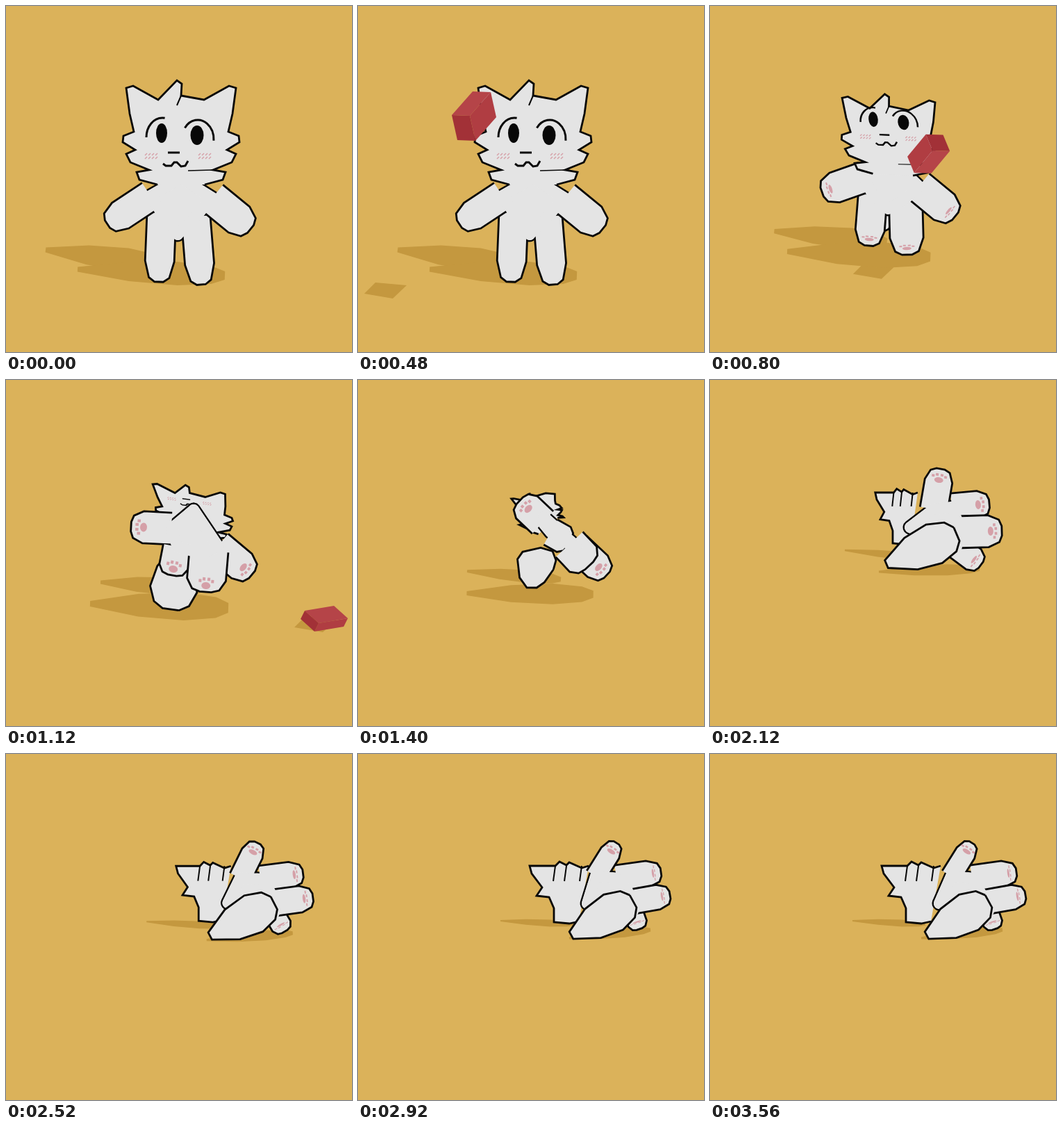
These frames come from a looping animation (498x498 px, 3.6 s). An HTML page with a canvas:

```html
<!DOCTYPE html>
<html>
<head>
<meta charset="utf-8">
<style>
html, body { margin: 0; height: 100%; overflow: hidden; background: #dbb25a; }
canvas { display: block; }
</style>
</head>
<body>
<canvas id="stage" width="498" height="498"></canvas>
<script>
const ctx = document.getElementById('stage').getContext('2d');
const INK = '#080808', FUR = '#e4e4e4', PINK = '#d5a0a8', SHADE = '#c4983f';
const LOOP = 3600, HIT = 540, LAND = 1120;

const mix = (a, b, u) => a + (b - a) * u;
const blend = (a, b, u) => Array.isArray(a) ? a.map((v, i) => blend(v, b[i], u)) : mix(a, b, u);
const parse = text => text.split(' ').map(p => p.split(',').map(Number));
const mirror = pts => pts.map(([x, y]) => [x, -y]).reverse();

// Half profiles: position along the axis, half width.
const limbHalf = parse('0,1 .7,1 .94,.7 1,.3');
const spindleHalf = parse('0,.35 .09,.75 .32,1 .65,.82 1,.2');
const LIMB = [...limbHalf, ...mirror(limbHalf)];
const SPINDLE = [...spindleHalf, ...mirror(spindleHalf), spindleHalf[0]];

// The facing head is symmetric apart from its tuft.
const cheek = parse('-34,72 -60,65 -64,54 -46,51 -73,40 -79,28 -66,22 -84,11 -83,2 -68,-4 -74,-30 -79,-67 -69,-70 -33,-50');
const FACING = [...cheek, ...parse('-6,-78 1,-73 0,-56'), ...cheek.map(([x, y]) => [-x, y]).reverse()];
const LYING = parse('-14,80 -28,83 -50,81 -50,61 -57,45 -75,43 -67,31 -82,11 -85,0 -48,0 -42,-6 -32,-1 -28,-5 -10,3 0,0');

// Limbs: base x, y, tip x, y, half width, paw pad length. Head: affine matrix.
const standing = {
  order: 'tail body legL legR armL armR fill head', shape: FACING, tilt: 0,
  head: [1, 0, 0, 1, 252, 185], chest: [252, 248], belly: [247, 329],
  armL: [208, 273, 146, 314, 22, 0], armR: [297, 276, 352, 321, 24, 0],
  legL: [224, 298, 220, 397, 21, 0], legR: [273, 303, 281, 401, 21, 0],
  tail: [240, 320, 250, 270, 15],
  shadows: [[230, 372, 57, 351, 17], [315, 388, 103, 379, 17]]
};
const airborne = {
  order: 'head tail body armL armR legL legR fill', shape: FACING, tilt: 1,
  head: [.66, .09, .1, .49, 270, 190], chest: [270, 187], belly: [268, 246],
  armL: [238, 214, 180, 211, 23, 1], armR: [305, 239, 354, 280, 23, .8],
  legL: [247, 240, 239, 281, 21, -1], legR: [292, 246, 287, 305, 28, -1],
  tail: [237, 330, 250, 240, 34],
  shadows: [[285, 300, 136, 291, 13], [320, 328, 121, 322, 20]]
};
const landing = {
  order: 'head body armR legL legR armL fill tail', shape: LYING, tilt: 3,
  head: [.55, 0, 0, .72, 273, 164], chest: [264, 208], belly: [324, 207],
  armL: [298, 195, 293, 131, 21, .8], armR: [325, 240, 363, 281, 19, .8],
  legL: [312, 195, 362, 171, 20, 1], legR: [318, 226, 385, 224, 25, 1],
  tail: [318, 227, 214, 267, 30],
  shadows: [[300, 272, 181, 257, 5], [360, 286, 197, 290, 9]]
};
const sliding = {
  ...landing,
  head: [.72, 0, 0, .9, 299, 162], chest: [288, 212], belly: [355, 200],
  armL: [322, 186, 332, 128, 20, .8], armR: [355, 240, 390, 266, 18, .4],
  legL: [348, 183, 402, 178, 20, .8], legR: [355, 219, 420, 217, 23, .8],
  tail: [355, 222, 254, 265, 30],
  shadows: [[330, 258, 194, 245, 6], [388, 272, 243, 276, 8]]
};
const resting = {
  ...landing,
  head: [1, 0, 0, 1, 332, 161], chest: [330, 215], belly: [388, 197],
  armL: [342, 176, 372, 128, 15, .6], armR: [396, 226, 405, 252, 14, .2],
  legL: [372, 179, 436, 170, 19, .3], legR: [392, 213, 449, 203, 18, .3],
  tail: [396, 212, 307, 261, 29],
  shadows: [[310, 245, 205, 240, 5], [421, 253, 304, 265, 7]]
};
// The body slides on a little while the head stays.
const settled = { ...resting };
for (const part of ['armL', 'armR', 'legL', 'legR', 'tail'])
  settled[part] = resting[part].map((v, i) => i === 0 || i === 2 ? v + 5 : v);

const linear = u => u, easeOut = u => 1 - (1 - u) ** 2;
const keys = [
  [0, standing, linear], [HIT, standing, linear], [LAND, airborne, linear], [1720, landing, linear],
  [2120, sliding, easeOut], [2920, resting, easeOut], [3560, settled, linear], [LOOP, settled, linear]
];

function draw(pts, fill, stroke, width = 2.8) {
  ctx.beginPath();
  pts.forEach(p => ctx.lineTo(...p));
  if (fill) { ctx.fillStyle = fill; ctx.fill(); }
  if (stroke) { ctx.strokeStyle = stroke; ctx.lineWidth = width; ctx.stroke(); }
}

// Stretches a profile from base to tip; foreshortened parts keep some length.
function along(profile, [x0, y0, x1, y1, w], minLength = 0) {
  const len = Math.hypot(x1 - x0, y1 - y0), dx = (x1 - x0) / len, dy = (y1 - y0) / len;
  const reach = Math.max(len, minLength);
  return profile.map(([s, k]) => [x0 + dx * s * reach - dy * k * w, y0 + dy * s * reach + dx * k * w]);
}

function drawPad([x0, y0, x1, y1, , size]) {
  if (Math.abs(size) < 0.1) return;
  ctx.save();
  ctx.translate(x1, y1);
  ctx.rotate(Math.atan2(y1 - y0, x1 - x0));
  ctx.translate(-9 - 9 * Math.max(size, 0), 0);
  ctx.scale(size, 1);
  ctx.fillStyle = PINK;
  ctx.beginPath();
  ctx.ellipse(0, 0, 5, 6.5, 0, 0, 7);
  ctx.fill();
  for (const y of [-9, -3.5, 3.5, 9]) ctx.fillRect(9 - Math.abs(y) / 2, y - 2, 4.5, 4);
  ctx.restore();
}

function drawLimb(limb) {
  draw(along(LIMB, limb, 1.5 * limb[4]), FUR, INK);
  drawPad(limb);
}

function drawBody(pose, outlined) {
  const bases = ['chest', 'armL', 'legL', 'belly', 'legR', 'armR', 'chest'].map(name => pose[name].slice(0, 2));
  ctx.lineJoin = ctx.lineCap = 'round';
  if (outlined) draw(bases, INK, INK, 21);
  draw(bases, FUR, FUR, 16);
  ctx.lineJoin = 'miter';
  ctx.lineCap = 'butt';
}

function ellipse(x, y, rx, ry, from = 0, to = 2) {
  ctx.beginPath();
  ctx.ellipse(x, y, rx, ry, 0, from * Math.PI, to * Math.PI);
}

const mouth = parse('-26,42 -22,45 -14,45 -10,40 -6,40 0,46 6,45 10,38');

// The face slides up the head as it tilts back.
function drawFace(matrix, tilt) {
  ctx.save();
  ctx.transform(...matrix);
  if (tilt < 0.5) {
    draw([[0, -56], [-6, -42]], null, INK, 2);
    draw([[10, 52], [45, 51]], null, INK, 1.5);
  }
  ctx.translate(0, -62 * tilt);
  ctx.lineWidth = 3;
  if (tilt < 0.5) for (const [x, y, rx, from, to] of [[-28, -2, 8, 1, 1.55], [23, 1, 9.5, 1.2, 2.02]]) {
    ellipse(x, y, rx, 14);
    ctx.fillStyle = INK;
    ctx.fill();
    ellipse(x + 1, y + 6, 23, 28, from, to);
    ctx.strokeStyle = INK;
    ctx.stroke();
  }
  draw([[-19, 26], [-2, 26]], null, INK, 3);
  draw(mouth, null, INK, 3);
  for (const x of [-44, 33])
    for (let i = 0; i < 8; i++) {
      const px = x - 8 + i % 4 * 5, py = 28 + (i >> 2) * 5;
      draw([[px, py + 2], [px + 3, py - 1]], null, PINK, 1.5);
    }
  ctx.restore();
}

const place = (pts, [a, b, c, d, e, f]) => pts.map(([x, y]) => [a * x + c * y + e, b * x + d * y + f]);

function drawHead(from, to, u, pose) {
  const [a, b] = [from, to].map(p => place(p.shape, p.head));
  const n = Math.max(a.length, b.length);
  const pick = (pts, i) => pts[Math.floor(i * pts.length / n)];
  draw(Array.from({ length: n }, (_, i) => blend(pick(a, i), pick(b, i), u)), FUR, INK);
  if (pose.tilt < 1.5) drawFace(pose.head, pose.tilt);
  if (pose.tilt > 2.5) for (const x of [-48, -32, -10]) draw(place([[x, 0], [x - 3, 22]], pose.head), null, INK, 2);
}

function drawCat(t) {
  const i = keys.findIndex((k, j) => t < keys[j + 1][0]);
  const [start, from, ease] = keys[i], [end, to] = keys[i + 1];
  const u = ease((t - start) / (end - start)), pose = {};
  for (const part in from)
    if (part !== 'order' && part !== 'shape') pose[part] = blend(from[part], to[part], u);
  for (const shadow of pose.shadows) draw(along(SPINDLE, shadow), SHADE);
  for (const part of (u < 0.5 ? from : to).order.split(' ')) {
    if (part === 'head') drawHead(from, to, u, pose);
    else if (part === 'body') drawBody(pose, true);
    else if (part === 'fill') drawBody(pose, false);
    else if (part === 'tail') draw(along(SPINDLE, pose.tail), FUR, INK);
    else drawLimb(pose[part]);
  }
}

// A brick is its near corner and the three edges leaving it.
const thrownEdges = parse('-26,-1 30,-34 8,36'), landedEdges = parse('-20,-18 42,-7 -6,12');
const faceColors = ['#b54448', '#b03d42', '#a23137'];

function drawBrick(t) {
  const flight = Math.min(t, HIT) - 480;
  const u = Math.max(0, Math.min(1, (t - HIT) / (LAND - HIT)));
  const slide = Math.max(0, t - LAND) * 0.45;
  const x = mix(161 + 0.9 * flight, 450, u) + slide, y = mix(158 + 0.24 * flight, 350, u * u);
  const sx = mix(40 + 0.45 * flight, 446, u) + slide, sy = mix(410 - 0.07 * flight, 352, u);
  const spin = 2 * Math.PI * u, cos = Math.cos(spin), sin = Math.sin(spin);
  const edges = place(blend(thrownEdges, landedEdges, u), [cos, sin, -sin, cos, 0, 0]);
  draw([[sx - 31, sy + 4], [sx - 15, sy - 12], [sx + 30, sy - 8], [sx + 10, sy + 11]], SHADE);
  return () => faceColors.forEach((color, i) => {
    const [ax, ay] = edges[i], [bx, by] = edges[(i + 1) % 3];
    draw([[x, y], [x + ax, y + ay], [x + ax + bx, y + ay + by], [x + bx, y + by]], color);
  });
}

function render() {
  const t = Math.floor((performance.now() - begin) % LOOP / 40) * 40;
  ctx.fillStyle = '#dbb25a';
  ctx.fillRect(0, 0, 498, 498);
  const drawFaces = t >= 240 && t < 1400 && drawBrick(t);
  drawCat(t);
  if (drawFaces) drawFaces();
  requestAnimationFrame(render);
}
const begin = performance.now();
render();
</script>
</body>
</html>
```
